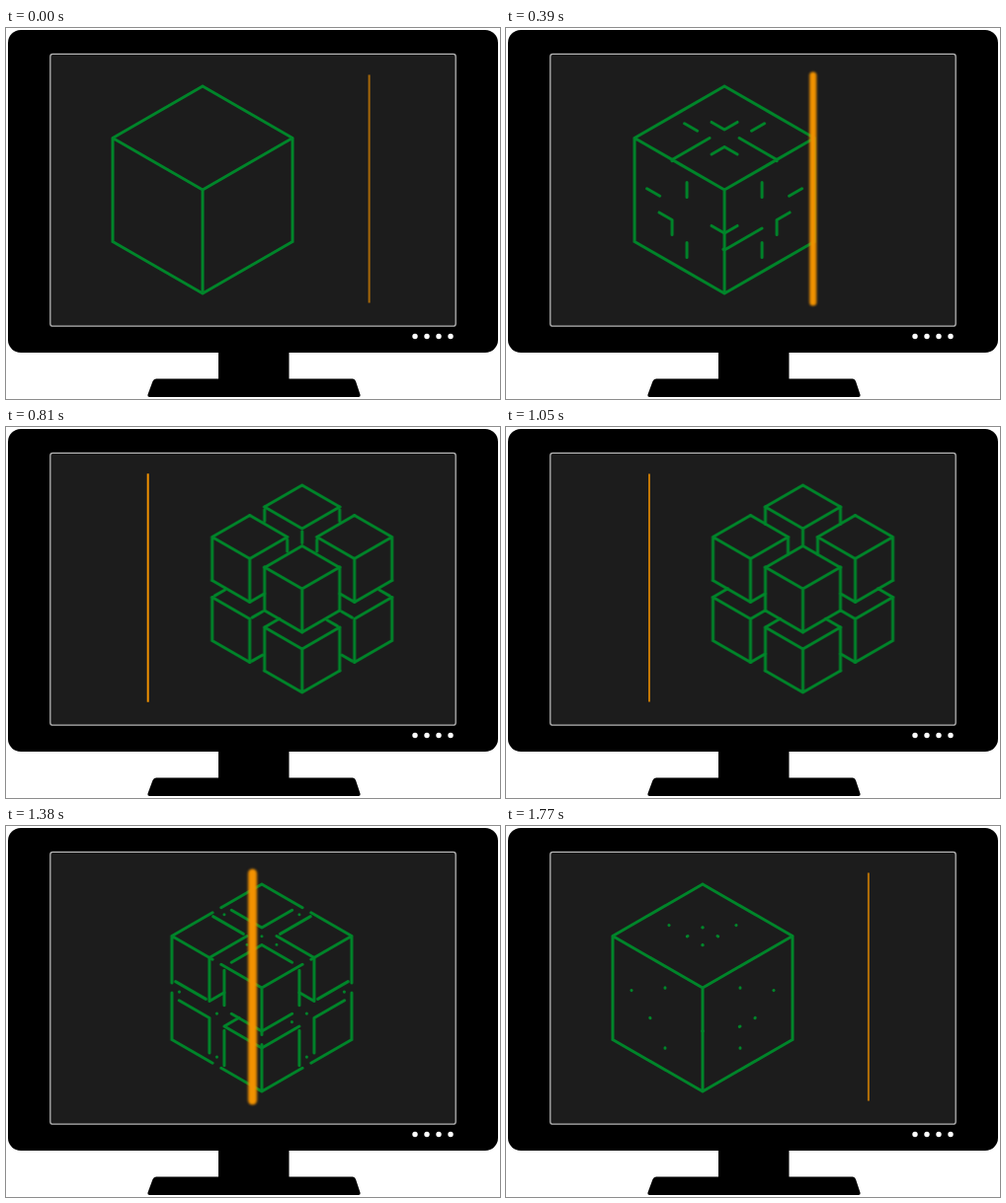
Animation, 500 px wide and 376 px high, one loop 1800 ms. Source, as an HTML page:

```html
<!DOCTYPE html>
<html lang="en">
<head>
<meta charset="utf-8">
<title>Splitting cube</title>
<style>
  html, body { margin: 0; width: 100%; height: 100%; overflow: hidden; background: #fff; }
  svg { display: block; width: 500px; height: 376px; }

  .cube { fill: none; stroke: #00852a; stroke-width: 3; stroke-linecap: round; stroke-linejoin: round; }
  .scan { stroke: #f29200; stroke-linecap: round; }

  .cube, .cube path {
    animation: 1.8s cubic-bezier(.364, 0, .636, 1) infinite;
  }
  .cube { animation-name: slide; }
  .cube .edges { animation-name: part; }
  .cube .arms { animation-name: arm, shown; }
  .cube .mids { animation-name: mid, shown; }
  .cube .trails { animation-name: trail, shown; }
  .cube .late { animation-name: late, lateShown; }

  .scan { animation: sweep 1.8s infinite, swell 1.8s cubic-bezier(.364, 0, .636, 1) infinite; }

  @keyframes slide {
    0%, 10.33%, 97.28%, 100% { transform: translate(199px, 164px); }
    47.22%, 60.39% { transform: translate(300.5px, 164px); }
  }
  /* outline halves overlap at rest, then pull back to leave gaps */
  @keyframes part {
    0%, 7.39%, 100% { stroke-dasharray: 62px 120px; }
    43.39%, 67.22% { stroke-dasharray: 44px 120px; }
  }
  @keyframes arm {
    0%, 7.39%, 100% { stroke-dasharray: 0px 120px; }
    43.39%, 67.22% { stroke-dasharray: 44px 120px; }
  }
  /* grows from the middle of each line */
  @keyframes mid {
    0%, 7.39%, 100% { stroke-dasharray: 0px 120px; stroke-dashoffset: -22px; }
    43.39%, 67.22% { stroke-dasharray: 44px 120px; stroke-dashoffset: 0px; }
  }
  @keyframes trail {
    0%, 7.39%, 100% { stroke-dasharray: 0px 200px; }
    43.39%, 67.22% { stroke-dasharray: 132px 200px; }
  }
  @keyframes late {
    0%, 34.44%, 77.22%, 100% { stroke-dasharray: 0px 120px; stroke-dashoffset: -8.7px; }
    51.67%, 60% { stroke-dasharray: 17.4px 120px; stroke-dashoffset: 0px; }
  }
  @keyframes shown {
    0%, 7.39% { visibility: hidden; }
    7.4%, 100% { visibility: visible; }
  }
  @keyframes lateShown {
    0%, 34.44%, 77.23%, 100% { visibility: hidden; }
    34.45%, 77.22% { visibility: visible; }
  }
  @keyframes sweep {
    0% { transform: translateX(367.6px); animation-timing-function: cubic-bezier(.62, 0, .666, 1); }
    47.78% { transform: translateX(141.3px); }
    54.72% { transform: translateX(141.3px); animation-timing-function: cubic-bezier(.364, 0, .636, 1); }
    100% { transform: translateX(367.6px); }
  }
  @keyframes swell {
    0%, 5.56%, 48.33%, 55.56%, 100% { stroke-width: 1.3px; filter: blur(0px); }
    31.11%, 81.11% { stroke-width: 9.5px; filter: blur(1.4px); }
  }
</style>
</head>
<body>
<svg viewBox="0 0 500 376">
  <rect x="2" y="2" width="496" height="327" rx="13"/>
  <path d="M215 326H286.5V355.5H351Q353 355.500 354 358L358.500 371.500Q359 374 356.500 374H145.500Q143 374 143.500 371.500L148.500 358Q149.500 355.500 152 355.500H215Z"/>
  <rect x="44.800" y="26.400" width="410.400" height="275.800" rx="2.500" fill="#1c1c1c" stroke="#b4b4b4" stroke-width="1.300"/>
  <g fill="#fff">
    <circle cx="414" cy="312.500" r="2.700"/>
    <circle cx="426" cy="312.500" r="2.700"/>
    <circle cx="438" cy="312.500" r="2.700"/>
    <circle cx="450" cy="312.500" r="2.700"/>
  </g>

  <g class="cube">
    <path class="edges" d="
      M0 0L-91-52.5M-91-52.5L0 0 M0 0L91-52.5M91-52.5L0 0 M0 0V105M0 105V0
      M0-105L-91-52.5M-91-52.5L0-105 M0-105L91-52.5M91-52.5L0-105
      M-91-52.5V52.5M-91 52.5V-52.5 M91-52.5V52.5M91 52.5V-52.5
      M0 105L-91 52.5M-91 52.5L0 105 M0 105L91 52.5M91 52.5L0 105"/>
    <path class="arms" d="
      M0-61l-38-22M0-61l38-22 M0-43.500l-38 22M0-43.500l38 22 M0 44l-38-22M0 44l38-22
      M-53 30.500l-38-22M-53 30.500v44 M53 30.500l38-22M53 30.500v44"/>
    <path class="mids" d="
      M-53-74.500l38 22M53-74.500l-38 22 M-91-8.500l38 22M91-8.500l-38 22
      M-38-22v44M38-22v44 M-38 39v44M38 39v44"/>
    <path class="trails" d="
      M-15-52.500l-38 22v44l15-8.700 M15-52.500l38 22v44l-15-8.700
      M38 39l-38 22l-38-22l15-8.700"/>
    <path class="late" d="
      M-38-83v17.400M38-83v17.400 M-15-52.500v17.400M15-52.500v17.400 M0-61v17.400
      M-91 8.500l15-8.700M91 8.500l-15-8.700 M-53 30.500l15-8.700M53 30.500l-15-8.700
      M-53 74.500l15-8.700M53 74.500l-15-8.700 M38 39l-15-8.700"/>
  </g>

  <path class="scan" d="M0 48V278"/>
</svg>
</body>
</html>
```
